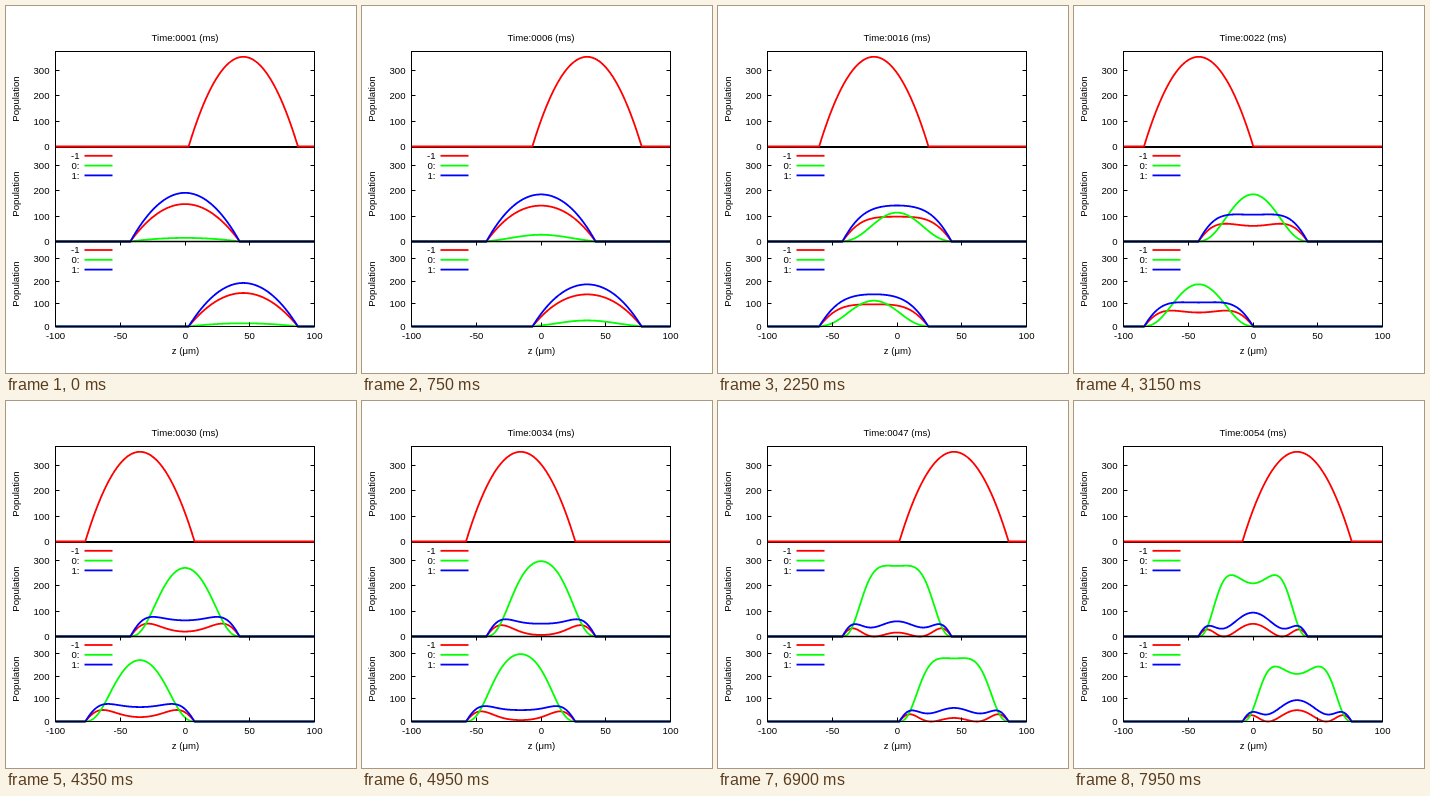
Recreate the animation shown at these times as an HTML page with a canvas. Size 350 by 367 pixels, loop 8000 ms.

```html
<!DOCTYPE html>
<html lang="en">
<head>
<meta charset="utf-8">
<title>Spin populations in a trap</title>
<style>
html, body { margin: 0; width: 100%; height: 100%; overflow: hidden; background: #fff; }
canvas { display: block; }
</style>
</head>
<body>
<canvas id="plot" width="350" height="367"></canvas>
<script>
const g = document.getElementById("plot").getContext("2d");
const LOOP = 8000, STEP = 150;
const LEFT = 49.5, RIGHT = 308.5, Y_MAX = 375;
const RADIUS = 42.2, SWING = 45, TRAP_RATE = 0.132;
const PEAK = 354, MAGNET = 0.125, MIX_RATE = Math.PI / 38;
const RED = "#f00", GREEN = "#0f0", BLUE = "#00f";
const LEGEND = [["-1", RED], ["0:", GREEN], ["1:", BLUE]];
const PANELS = [
  { top: 45.5, bottom: 140.5 },
  { top: 140.5, bottom: 235.5, legend: 149.8 },
  { top: 235.5, bottom: 320.5, legend: 244 }
];

const xOf = z => LEFT + (z + 100) / 200 * (RIGHT - LEFT);
const yOf = (p, v) => p.bottom - v / Y_MAX * (p.bottom - p.top);

function line(x1, y1, x2, y2, color = "#000", width = 1) {
  g.strokeStyle = color;
  g.lineWidth = width;
  g.beginPath();
  g.moveTo(x1, y1);
  g.lineTo(x2, y2);
  g.stroke();
}

function text(s, x, y, align = "center") {
  g.textAlign = align;
  g.fillText(s, x, y);
}

function curve(p, center, color, f) {
  g.strokeStyle = color;
  g.lineWidth = 1.8;
  g.beginPath();
  for (let z = -100; z <= 100; z += 0.25) {
    const u = (z - center) / RADIUS;
    g.lineTo(xOf(z), yOf(p, f(Math.max(0, 1 - u * u))));
  }
  g.stroke();
}

// Local spin mixing: the rate scales with density d, magnetisation is conserved.
function spinCurves(p, center, time) {
  const zero = d => 0.4575 - 0.4175 * Math.cos(MIX_RATE * d * time);
  const side = sign => d => PEAK * d * (1 - zero(d) + sign * MAGNET) / 2;
  curve(p, center, RED, side(-1));
  curve(p, center, GREEN, d => PEAK * d * zero(d));
  curve(p, center, BLUE, side(1));
}

function axes(p) {
  for (let v = 0; v <= 300; v += 100) {
    const y = Math.round(yOf(p, v) - 0.5) + 0.5;
    line(LEFT, y, LEFT + 4, y);
    line(RIGHT - 4, y, RIGHT, y);
    text(v, 43.5, y + 3.5, "right");
  }
  g.save();
  g.translate(13.2, (p.top + p.bottom) / 2);
  g.rotate(-Math.PI / 2);
  text("Population", 0, 0);
  g.restore();
  if (p.legend) LEGEND.forEach(([name, color], i) => {
    const y = p.legend + i * 9.8;
    text(name, 73.5, y + 3.3, "right");
    line(78.5, y, 106.5, y, color, 1.8);
  });
}

function draw(time) {
  const center = SWING * Math.cos(TRAP_RATE * time);
  const [single, still, moving] = PANELS;
  g.fillStyle = "#fff";
  g.fillRect(0, 0, 350, 367);
  g.fillStyle = "#000";
  g.font = '9.6px "Liberation Sans", Arial, sans-serif';

  text("Time:" + String(time + 1).padStart(4, "0") + " (ms)", 179, 35);
  PANELS.forEach(axes);
  line(LEFT, 141, RIGHT, 141, "#000", 2);
  curve(single, center, RED, d => PEAK * d);
  spinCurves(still, 0, time);
  spinCurves(moving, center, time);

  line(LEFT, 235.5, RIGHT, 235.5, "#000", 1.4);
  g.lineWidth = 1;
  g.strokeRect(LEFT, 45.5, RIGHT - LEFT, 275);
  for (let z = -100; z <= 100; z += 50) {
    const x = Math.round(xOf(z) - 0.5) + 0.5;
    line(x, 316.5, x, 320.5);
    line(x, 235.5, x, 239.5);
    text(z, x, 333);
  }
  text("z (μm)", 179.5, 348);
}

function tick() {
  draw(Math.floor(performance.now() % LOOP / STEP));
  requestAnimationFrame(tick);
}
tick();
</script>
</body>
</html>
```
